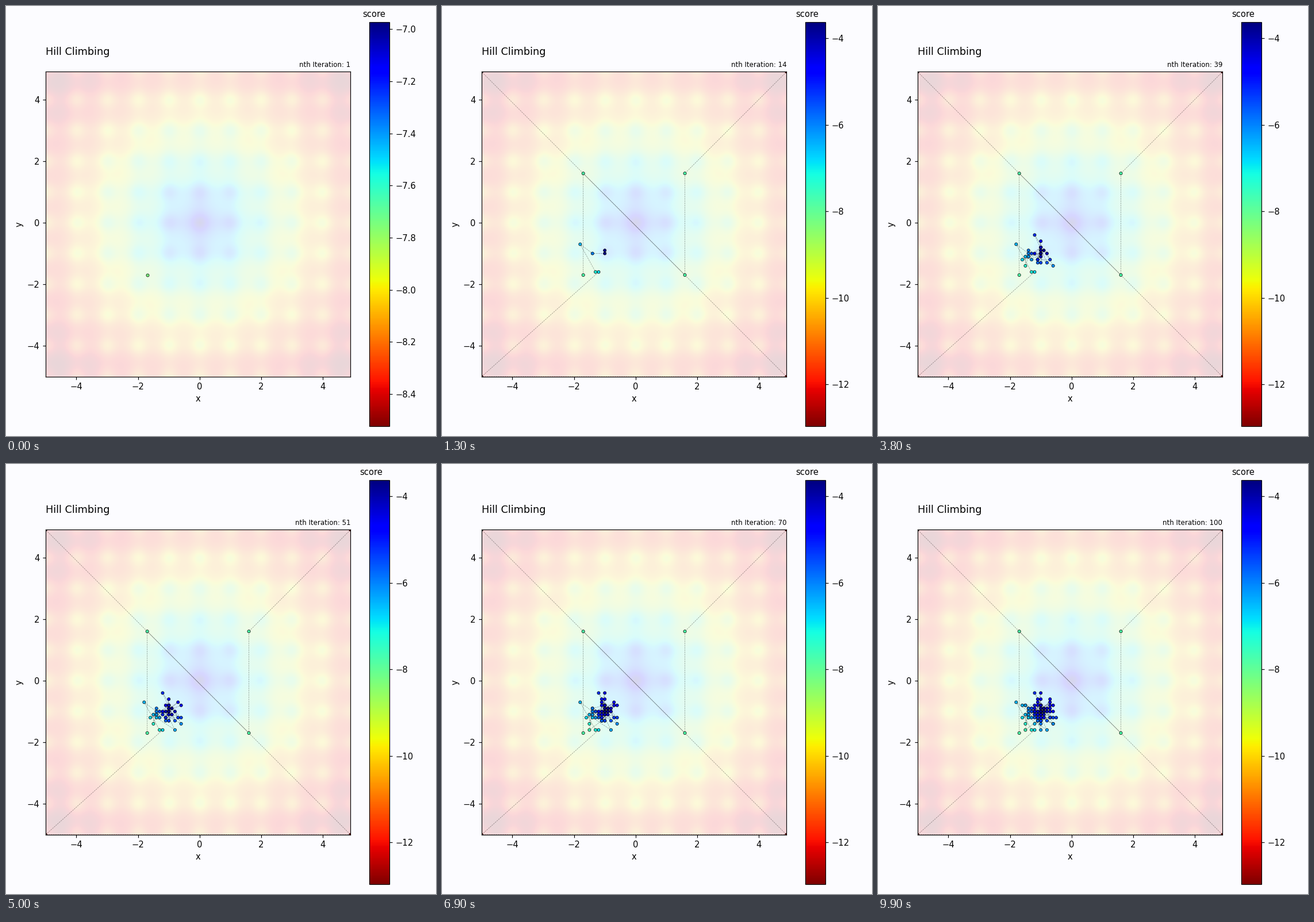
Recreate the animation shown at these times as a matplotlib script. Size 748x748 px, loop 10000 ms.

```python
import numpy as np
import matplotlib.pyplot as plt
from matplotlib.animation import FuncAnimation
from matplotlib.colors import Normalize

SIZE, DPI, STEPS = 748, 88, 100
K = 106 / DPI            # scale of point sizes
PAPER = "#fcfcff"
LOW, HIGH = -5, 4.9

plt.rcParams.update({
    "font.family": "DejaVu Sans",
    "font.size": 10 * K,
    "axes.linewidth": 0.8 * K,
    "axes.labelpad": 4 * K,
    "axes.facecolor": PAPER,
    "figure.facecolor": PAPER,
})
for axis in ("xtick", "ytick"):
    plt.rcParams.update({
        f"{axis}.major.size": 3.5 * K,
        f"{axis}.major.width": 0.8 * K,
        f"{axis}.major.pad": 3.5 * K,
    })


def score(x, y):
    """Negated Ackley function."""
    bowl = 20 * np.exp(-0.2 * np.sqrt((x * x + y * y) / 2))
    waves = np.exp((np.cos(2 * np.pi * x) + np.cos(2 * np.pi * y)) / 2)
    return bowl + waves - 20 - np.e


def make_walk():
    """Inner grid, corners, a short climb, then normal steps around a local peak."""
    grid = [(x, y) for x in (-1.7, 1.6) for y in (-1.7, 1.6)]
    corners = [(x, y) for y in (HIGH, LOW) for x in (HIGH, LOW)]
    peak = (-1, -1)
    climb = [(-1.2, -1.6), (-1.3, -1.6), (-1.8, -0.7), (-1.4, -1), peak]
    start = grid + corners + climb
    rng = np.random.default_rng(7)
    steps = rng.normal(0, 0.28, (STEPS - len(start), 2)).clip(-0.6, 0.6)
    return np.vstack([start, (peak + steps).round(1)])


walk = make_walk()
scores = score(*walk.T)

fig = plt.figure(figsize=(SIZE / DPI, SIZE / DPI), dpi=DPI)


def add_axes(left, top, width, height):
    return fig.add_axes([left / SIZE, 1 - (top + height) / SIZE,
                         width / SIZE, height / SIZE])


def add_text(x, y, text, size, ha):
    return fig.text(x / SIZE, 1 - y / SIZE, text, fontsize=size * K,
                    ha=ha, va="baseline")


ax = add_axes(68.9, 114.4, 530.4, 530.4)
cax = add_axes(632.1, 28.2, 35.15, 703)

# Score landscape
side = np.linspace(LOW, HIGH, 100)
ax.imshow(score(*np.meshgrid(side, side)), cmap="jet_r", alpha=0.15,
          origin="lower", interpolation="bilinear", aspect="auto",
          extent=(LOW - 0.05, HIGH + 0.05, LOW - 0.05, HIGH + 0.05))
ax.set(xlim=(LOW, HIGH), ylim=(LOW, HIGH), xlabel="x", ylabel="y",
       xticks=range(-4, 5, 2), yticks=range(-4, 5, 2))

# Walk
trail, = ax.plot([], [], "--", color="black", alpha=0.4, lw=0.5 * K, zorder=2.2)
dots = ax.scatter(*walk[:1].T, c=scores[:1], cmap="jet_r",
                  norm=Normalize(-8.5, -7), s=12 * K * K, edgecolors="black",
                  linewidths=0.5 * K, zorder=2.4)
fig.colorbar(dots, cax=cax)
cax.set_ylabel("score", rotation=0, labelpad=-50 * K, y=1.03,
               ha="center", va="top")

add_text(68.9, 85, "Hill Climbing", 12, "left")
counter = add_text(599.3, 105.6, "", 8, "right")


def draw(i):
    n = i + 1
    seen, values = walk[:n], scores[:n]
    lo, hi = values.min(), values.max()
    if lo == hi:
        lo, hi = 1.1 * lo, 0.9 * hi
    trail.set_data(*seen.T)
    dots.set_offsets(seen)
    dots.set_array(values)
    dots.set_clim(lo, hi)
    counter.set_text(f"nth Iteration: {n}")
    return trail, dots, counter


anim = FuncAnimation(fig, draw, frames=STEPS, interval=100,
                     repeat=True, repeat_delay=0)
plt.show()
```
